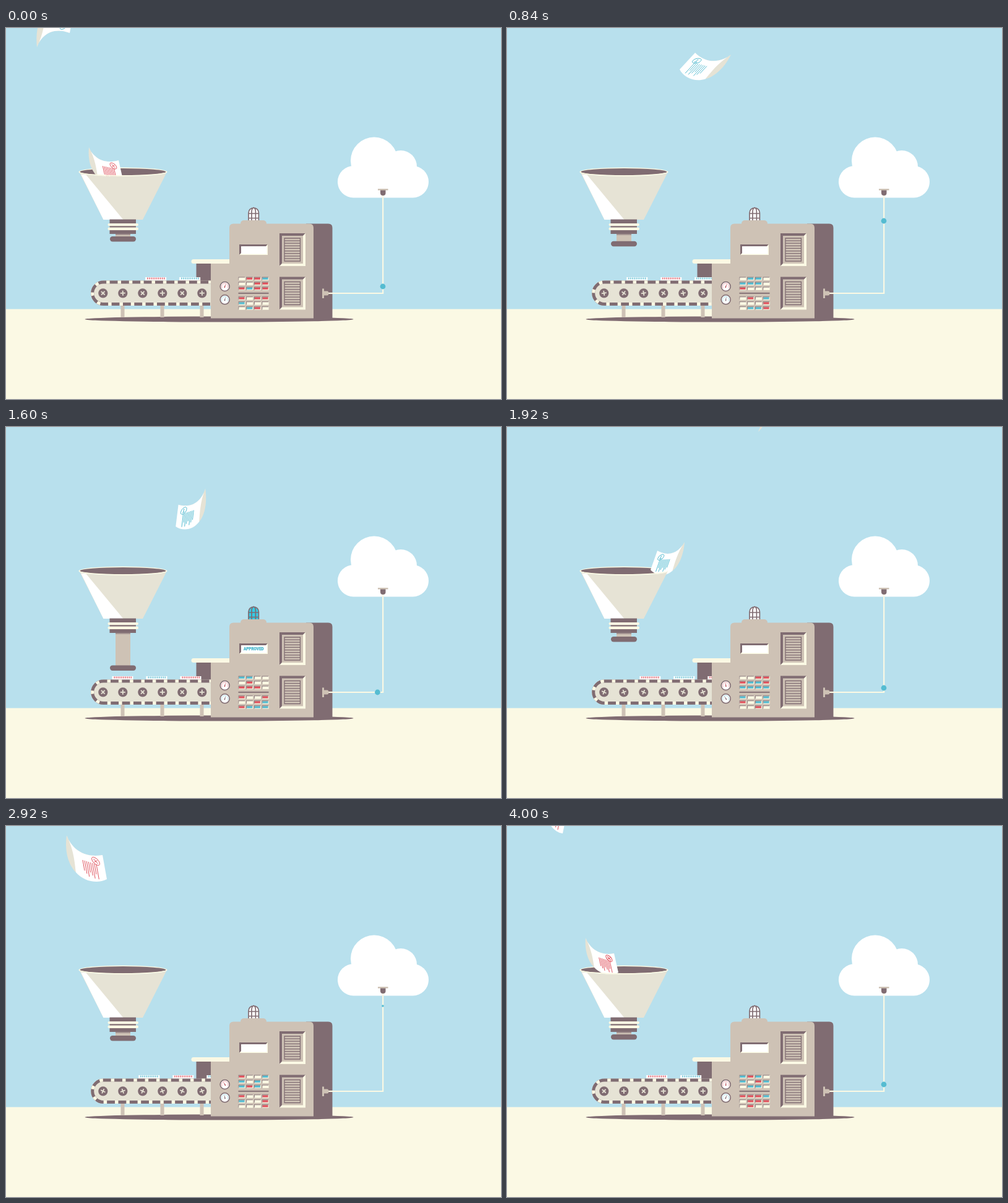
These frames come from a looping animation (800x600 px, 4.04 s). An HTML page:

```html
<!DOCTYPE html>
<html lang="en">
<head>
<meta charset="utf-8">
<title>Paper to cloud machine</title>
<style>
  html, body { margin: 0; width: 100%; height: 100%; overflow: hidden; background: #b8e0ed; }
  svg { display: block; }
  .dark { fill: #806c72; }
  .tan { fill: #cec2b5; }
  .beige { fill: #e6e3d5; }
  .cream { fill: #fbf9e4; }
  .white { fill: #fff; }
  .line { fill: none; stroke: #806c72; }
  .ray { stroke-width: 4; fill: none; }
  .mark path, .mark ellipse { fill: none; stroke-width: 1; vector-effect: non-scaling-stroke; }
  #label { font: 900 6.3px Roboto, "Open Sans", sans-serif; fill: #55bcd1; stroke: #55bcd1; stroke-width: .3; text-anchor: middle; }
</style>
</head>
<body>
<svg id="stage" width="800" height="600" viewBox="0 0 800 600">
  <rect width="800" height="600" fill="#b8e0ed"/>
  <rect class="cream" y="454.600" width="800" height="146"/>

  <!-- cloud and cable -->
  <g id="cloud" class="white">
    <circle cx="595" cy="214.500" r="38"/>
    <circle cx="638" cy="224" r="26"/>
    <rect x="536" y="223" width="147" height="51.500" rx="25.700"/>
  </g>
  <g id="cloudRays" stroke="#55bcd1"></g>
  <path d="M516 429H609.200V268" fill="none" stroke="#fbf9e4" stroke-width="2.200"/>
  <path class="dark" d="M605 262h8.500v5q0 4-4.200 4t-4.300-4z"/>
  <rect class="tan" x="601" y="260" width="16.500" height="2.500"/>
  <circle id="ball" fill="#55bcd1"/>

  <!-- machine -->
  <ellipse class="dark" cx="344.500" cy="471" rx="217" ry="4.500"/>
  <g class="tan">
    <rect x="185.500" y="447" width="6" height="21"/>
    <rect x="249.500" y="447" width="6" height="21"/>
    <rect x="313.500" y="447" width="6" height="21"/>
  </g>
  <rect class="dark" x="307.500" y="379" width="30" height="32"/>
  <g id="docs"></g>
  <rect class="beige" x="137" y="408.500" width="220" height="40.500" rx="20.200"/>
  <path class="line" stroke-width="5" d="M350 411H157.500a17.800 17.800 0 0 0 0 35.600H350"/>
  <path id="belt" fill="none" stroke="#fbf9e4" stroke-width="5" stroke-dasharray="5.500 12.833" d="M350 411H157.500a17.800 17.800 0 0 0 0 35.600H350"/>
  <g id="wheels"></g>
  <path class="dark" d="M485 316.500H521q6.500 0 6.500 6.500V470H485z"/>
  <path class="tan" d="M331 380H361V323q0-6.500 6.500-6.500H379q0-5.500 6-5.500h30q6 0 6 5.500h69.500q6.500 0 6.500 6.500V469.500H331z"/>
  <path class="cream" d="M361 374H303a3.500 3.500 0 0 0 0 7H361z"/>
  <path id="bulb" d="M391.500 311V299a8.500 8.500 0 0 1 17 0V311z"/>
  <path class="line" stroke-width="1.700" d="M392 311V299a8.200 8.200 0 0 1 16.400 0V311M392 300h16.400M392 307.500h16.400M397 311V297q0-5 3.200-6.500q3.200 1.500 3.200 6.500V311"/>
  <g id="lampRays" stroke="#fff" stroke-linecap="round"></g>

  <path class="dark" d="M377 350H423L420 353H380V364L377 367z"/>
  <path class="cream" d="M423 350V367H377L380 364H420V353z"/>
  <rect class="white" x="380" y="353" width="41.500" height="12.500"/>
  <text id="label" x="400.300" y="361.300">APPROVED</text>
  <g id="vents"></g>
  <g id="gauges"></g>
  <rect class="dark" x="375.500" y="428" width="49" height="1.800"/>
  <g id="buttons"></g>
  <path d="M519 429H530" stroke="#fbf9e4" stroke-width="2.200"/>
  <path class="tan" d="M511 421.500h3v4h5q2.500 0 2.500 3.500t-2.500 3.500h-5v4.500h-3z"/>

  <!-- press -->
  <rect id="rod" class="tan" x="177" y="330" width="24"/>
  <rect class="dark" x="177" y="333" width="24" height="2" opacity=".5"/>
  <rect id="plate" class="dark" x="168" width="42" height="8.500" rx="4.200"/>

  <!-- funnel -->
  <ellipse class="cream" cx="189" cy="232.700" rx="71.500" ry="7.200"/>
  <ellipse class="dark" cx="189" cy="232.700" rx="69.500" ry="5.600"/>
  <g id="papers"></g>
  <path class="beige" d="M119 234L157.500 310H221L259.500 234A70.500 6.400 0 0 1 119 234z"/>
  <path class="white" d="M121 236.500L157.500 310H189.500L129.500 237.500z"/>
  <path d="M118.500 232.700A70.500 6.400 0 0 0 259.500 232.700" fill="none" stroke="#fbf9e4" stroke-width="1.800"/>
  <rect class="dark" x="167.500" y="309.500" width="42.500" height="23.500"/>
  <rect class="cream" x="164.500" y="316" width="49.500" height="4.200" rx="2.100"/>
  <rect class="cream" x="164.500" y="322.500" width="49.500" height="4.500" rx="2.200"/>
</svg>

<script>
const LOOP = 4040, FRAME = 40, CYCLE = 1000, PITCH = 55;
const TEAL = '#55bcd1', RED = '#e0545f', CREAM = '#fbf9e4';
const $ = id => document.getElementById(id);
const clamp = x => Math.max(0, Math.min(1, x));
const ramp = (x, a, b) => clamp((x - a) / (b - a));
const mix = (a, b, k) => a + (b - a) * k;
const easeInOut = x => x < .5 ? 2 * x * x : 1 - 2 * (1 - x) ** 2;
const mod = (a, b) => ((a % b) + b) % b;

function add(parent, tag, attrs) {
  const el = document.createElementNS('http://www.w3.org/2000/svg', tag);
  set(el, attrs);
  parent.appendChild(el);
  return el;
}
function set(el, attrs) {
  for (const k in attrs) el.setAttribute(k, attrs[k]);
}
const times = (n, fn) => Array.from({ length: n }, (_, i) => fn(i));

// Smooth curve through rows of [time, ...values]; null outside its span.
function track(rows, t) {
  const last = rows.length - 1;
  if (t < rows[0][0] || t > rows[last][0]) return null;
  let i = 0;
  while (i < last - 1 && t >= rows[i + 1][0]) i++;
  const a = rows[i], b = rows[i + 1], span = b[0] - a[0], x = (t - a[0]) / span;
  const slope = (k, c) => {
    const p = rows[Math.max(0, k - 1)], q = rows[Math.min(last, k + 1)];
    return (q[c] - p[c]) / (q[0] - p[0]) * span;
  };
  return a.slice(1).map((v, j) => {
    const c = j + 1, d = b[c] - v, m = slope(i, c), n = slope(i + 1, c);
    return v + x * (m + x * (3 * d - 2 * m - n + x * (m + n - 2 * d)));
  });
}

// ---- papers: each pose is tip, near corner, far corner ----
function poses(rows) {
  let prev = null;
  return rows.map(([t, tx, ty, ax, ay, bx, by]) => {
    const turn = (x, y, was) => {
      const a = Math.atan2(y, x);
      return was === undefined ? a : a + 2 * Math.PI * Math.round((was - a) / (2 * Math.PI));
    };
    const u = [ax - tx, ay - ty], v = [bx - ax, by - ay];
    return prev = [t, (tx + ax + bx) / 3, (ty + ay + by) / 3,
      Math.hypot(...u), turn(...u, prev?.[4]), Math.hypot(...v), turn(...v, prev?.[6])];
  });
}

function makePaper(color, rows) {
  const g = add($('papers'), 'g', {});
  add(g, 'path', { fill: '#e6e3d5', d: 'M0 0C.056 .39 .329 .705 1 0L.081 1.472C-.076 1.344 -.18 .917 0 0z' });
  add(g, 'path', { fill: '#fff', d: 'M0 0C.056 .39 .329 .705 1 0L1 1C.685 1.463 .278 1.695 .081 1.472C.094 1.077 .144 .523 0 0z' });
  const mark = add(g, 'g', { class: 'mark', stroke: color });
  const lines = times(8, i => {
    const k = i / 7, len = i === 7 ? .62 : .5 + .1 * (i % 3 - .6);
    return `M${.36 + .397 * k} ${.73 - .146 * k}v${len}`;
  }).join('');
  add(mark, 'path', { d: lines });
  add(mark, 'ellipse', { cx: .755, cy: .457, rx: .11, ry: .145 });
  add(mark, 'path', {
    d: color === RED ? 'M.7 .4L.81 .52M.81 .38L.7 .54' : 'M.73 .42L.76 .38V.53M.72 .53H.8'
  });
  return { g, rows: poses(rows) };
}

const papers = [
  makePaper(TEAL, [
    [0, 50, 31, 103, 8, 110, -30],
    [420, 215, 120, 205, 65, 171, 48],
    [840, 362, 43, 304, 40, 279, 67],
    [1240, 350, 22, 309, 57, 310, 94],
    [1920, 287, 186, 243, 200, 232, 231],
    [2160, 235, 255, 205, 268, 200, 295]]),
  makePaper(RED, [
    [1800, 410, -6, 398, -54, 420, -90],
    [1920, 406, 8, 394, -40, 416, -76],
    [2480, 235, 85, 283, 52, 319, 64],
    [2920, 98, 15, 156, 47, 163, 86],
    [3520, 93, 43, 125, 93, 115, 127],
    [4000, 127, 181, 173, 206, 180, 237],
    [4040, 134, 193, 182, 214, 189, 245],
    [4240, 165, 262, 205, 275, 210, 300]]),
  makePaper(RED, [
    [3880, 73, -93, 100, -40, 93, -6],
    [4000, 70, -75, 97, -22, 90, 12],
    [4039, 69, -69, 96, -16, 89, 18]])
];

function drawPaper({ g, rows }, t) {
  const p = track(rows, t) || track(rows, t + LOOP);
  g.style.display = p ? '' : 'none';
  if (!p) return;
  const [cx, cy, ul, ua, vl, va] = p;
  const ux = ul * Math.cos(ua), uy = ul * Math.sin(ua);
  const vx = vl * Math.cos(va), vy = vl * Math.sin(va);
  set(g, { transform: `matrix(${ux} ${uy} ${vx} ${vy} ${cx - (2 * ux + vx) / 3} ${cy - (2 * uy + vy) / 3})` });
}

// ---- fixed and repeated parts ----
const wheels = times(6, i => {
  const x = 156.8 + 32 * i;
  add($('wheels'), 'circle', { class: 'dark', cx: x, cy: 428.800, r: 7.6 });
  return add($('wheels'), 'path', { d: 'M-4 0H4M0 -4V4', stroke: '#e6e3d5', 'stroke-width': 1.8 });
});

const docs = times(9, i => {
  const g = add($('docs'), 'g', {});
  add(g, 'rect', { class: 'white', y: 403, width: 34, height: 7 });
  add(g, 'path', {
    d: 'M3 405H32', stroke: i % 2 ? RED : TEAL,
    'stroke-width': 3, 'stroke-dasharray': '1.300 1.700'
  });
  return { g, n: i - 4 };
});

for (const [y, h] of [[332, 53], [402.5, 53]]) {
  const x = 442, r = 484, b = y + h, v = $('vents');
  add(v, 'path', { class: 'dark', d: `M${x} ${y}H${r}L${r - 4} ${y + 4}H${x + 4}V${b - 4}L${x} ${b}z` });
  add(v, 'path', { class: 'cream', d: `M${r} ${y}V${b}H${x}L${x + 4} ${b - 4}H${r - 4}V${y + 4}z` });
  const slats = times(8, i => `M450 ${y + 8 + (h - 16) / 9 * (i + 1)}H475.500`).join('');
  add(v, 'path', { class: 'line', 'stroke-width': 1.3, d: `M450 ${y + 8}H475.500V${b - 8}H450z` + slats });
}

const needles = [[418, RED], [439.300, TEAL]].map(([y, color]) => {
  const g = add($('gauges'), 'g', { transform: `translate(353.700 ${y})` });
  add(g, 'circle', { r: 7.5, fill: '#fff', stroke: '#806c72', 'stroke-width': 1.6 });
  add(g, 'path', { d: 'M-4.500 2.500A5.100 5.100 0 1 1 4.500 2.500', fill: 'none', stroke: color, 'stroke-width': 1, 'stroke-dasharray': '1 1' });
  return add(g, 'path', { d: 'M-.900 2L0 -5L.900 2z', fill: color === RED ? '#b84c55' : '#806c72' });
});

const buttons = times(24, i => {
  const x = 375.5 + 12.7 * (i % 4), row = Math.floor(i / 4);
  const y = 402.5 + 8 * row + (row > 2 ? 7.8 : 0);
  const g = $('buttons');
  add(g, 'rect', { class: 'cream', x, y, width: 11, height: 5.5 });
  add(g, 'path', { class: 'dark', d: `M${x} ${y}h11l-1 1.200h-9v3.300l-1 1z` });
  return add(g, 'rect', { x: x + 1, y: y + 1.2, width: 9, height: 3.2 });
});

// Each ray starts from its own point [x, y] and runs along [dx, dy].
const makeRays = (id, rows) => rows.map(row => ({ row, el: add($(id), 'path', { class: 'ray' }) }));
const cloudRays = makeRays('cloudRays', [
  [607.4, 250, -.98, -.2], [602, 256.5, -.53, -.85],
  [610, 257, .555, -.83], [608.6, 252, .98, -.196]]);
const lampRays = makeRays('lampRays', [[400, 306, -.71, -.71], [400, 306, .71, -.71]]);

function drawRays(rays, from, to) {
  for (const { row: [x, y, dx, dy], el } of rays) {
    el.style.display = to - from > .5 ? '' : 'none';
    set(el, { d: `M${x + dx * from} ${y + dy * from}L${x + dx * to} ${y + dy * to}` });
  }
}

// time, distance along the cable
const ballPath = [[-1000, 0], [-760, 44], [-480, 75], [-80, 96], [0, 100],
  [480, 145], [840, 206], [920, 227], [1000, 245]];

const noise = (a, b) => mod(Math.sin(a * 12.9898 + b * 78.233) * 43758.5453, 1);

function drawPress(t) {
  const p = mod(t, CYCLE);
  const drop = p < 500 ? (p / 490) ** 2 : p < 540 ? 1 : ((CYCLE - p) / 460) ** 2;
  const y = 337 + 64 * Math.min(1, drop);
  set($('plate'), { y });
  set($('rod'), { height: y - 328 });
}

function drawBelt(t) {
  const late = t - 40, whole = Math.floor(late / CYCLE);
  const step = whole + easeInOut(clamp((mod(late, CYCLE) - 640) / 360));
  for (const { g, n } of docs) {
    const x = 171.5 + PITCH * (step - n);
    g.style.display = t >= n * CYCLE + 500 && x < 345 ? '' : 'none';
    set(g, { transform: `translate(${x} 0)` });
  }
  // at rest one cleat sits on the leftmost point
  set($('belt'), { 'stroke-dashoffset': step * PITCH - 16 });
  wheels.forEach((w, i) => set(w, {
    transform: `translate(${156.8 + 32 * i} 428.800) rotate(${(i % 2 ? 0 : 45) + 90 * step})`
  }));
}

function drawSignal(t) {
  const p = mod(t, 2000);
  const q = p >= 1000 ? p - 2000 : p;
  const d = track(ballPath, q)[0];
  set($('ball'), {
    cx: 520 + Math.min(d, 89), cy: 429 - Math.max(0, d - 89),
    r: 4.4 * ramp(q, -1000, -900) * (1 - ramp(q, 850, 970))
  });

  const fade = p < 1240 ? ramp(p, 1080, 1220) : 1 - ramp(p, 1260, 1420);
  const s = 1 - .11 * fade;
  set($('cloud'), {
    opacity: 1 - .75 * fade,
    transform: `translate(609.500 274.500) scale(${s}) translate(-609.500 -274.500)`
  });
  const out = p < 1240 ? mix(10, 60, ramp(p, 1140, 1240)) : mix(60, 104, ramp(p, 1240, 1400));
  const back = p < 1240 ? mix(10, 30, ramp(p, 1140, 1240)) : mix(30, 104, ramp(p, 1240, 1460));
  drawRays(cloudRays, back, out);

  const far = mix(26, 81, ramp(p, 1100, 1300));
  const len = 9 * Math.min(ramp(p, 1100, 1180), 1 - ramp(p, 1250, 1320));
  drawRays(lampRays, far - len / 2, far + len / 2);

  const glow = ramp(p, 1080, 1400) * (1 - ramp(p, 1640, 1800));
  set($('bulb'), { fill: `rgb(${mix(255, 53, glow)},${mix(255, 203, glow)},${mix(255, 229, glow)})` });
  $('label').style.display = p >= 1080 && p < 1760 ? '' : 'none';
}

function drawPanel(t) {
  const beat = Math.floor(t / 160);
  buttons.forEach((b, i) => {
    const n = noise(i + 1, beat + 1);
    set(b, { fill: n < .34 ? TEAL : n < .64 ? RED : CREAM });
  });
  needles.forEach((n, i) => set(n, {
    transform: `rotate(${-5 + 28 * Math.sin(t / 130 + i * 1.5 + 1)})`
  }));
}

function render(now) {
  const t = Math.floor(mod(now, LOOP) / FRAME + 1e-6) * FRAME;
  papers.forEach(p => drawPaper(p, t));
  drawPress(t);
  drawBelt(t);
  drawSignal(t);
  drawPanel(t);
}

const start = performance.now();
function tick() {
  render(performance.now() - start);
  requestAnimationFrame(tick);
}
tick();
</script>
</body>
</html>
```
